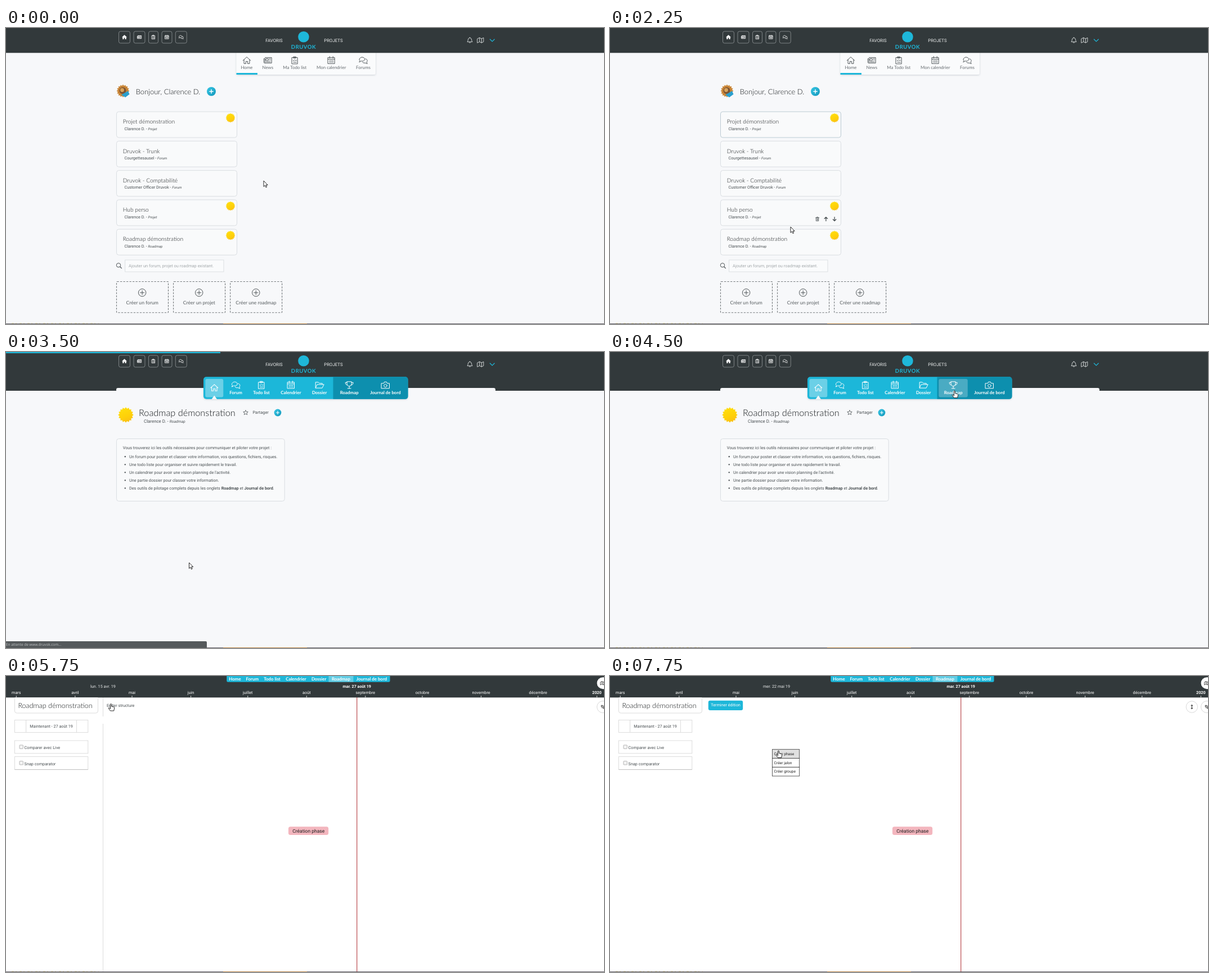
Recreate the animation shown at these times as an HTML page. Size 1063 px wide and 527 px high, loop 8 s.

```html
<!DOCTYPE html>
<html lang="fr">
<head>
<meta charset="utf-8">
<title>Roadmap</title>
<style>
html, body { margin: 0; width: 100%; height: 100%; overflow: hidden; background: #f7f8fa; }
svg { display: block; width: 100vw; height: 100vh; font-family: Roboto, sans-serif; text-rendering: geometricPrecision; }
.q { font-family: Lato, sans-serif; }
.o { font-family: "Open Sans", sans-serif; }
.m { text-anchor: middle; }
.l { font-weight: 300; }
.b { font-weight: 700; }
.i { font-style: italic; }
</style>
</head>
<body>
<svg id="stage" viewBox="0 0 1063 527" preserveAspectRatio="none"></svg>
<script>
const LOOP = 8000, STEP = 250;
const CYAN = '#1eb7d9', DARK = '#32393b', INK = '#4a5053', TITLE = '#14181a', SMALL = 7.27;
const BRAND = 'Druvok', USER = 'Clarence D.';

const ICONS = {
  home: 'M-7 .5L0-6L7 .5M-5-1.2V6H-1.6V2H1.6V6H5V-1.2',
  news: 'M-5-5H7V5H-6Q-7 5-7 4V-3H-5V4M-3-3H1V.5H-3ZM3-3H5M3-.5H5M-3 2.8H5',
  clip: 'M-5-5H5V6.5H-5ZM-2-6.5H2V-4H-2ZM-3 0L-2 1L-.5-1M1 0H3M-2.5 3.5H3',
  cal: 'M-6-5H6V6H-6ZM-6-2H6M-3-7V-4M3-7V-4M-3.5 .7H-2M-.7 .7H.7M2 .7H3.5M-3.5 3.3H-2M-.7 3.3H.7M2 3.3H3.5',
  chat: 'M-7 3Q-6 2-6 1C-9-2-5-5.8-2-5.6C4-5.5 4 1-1 1.5Q-3 1.7-4 1.2Q-5 3-7 3ZM4-2.6C8-2 8 1.6 6.3 3.3Q6.4 5 7.5 6Q5.4 6 4 4.8Q.5 5.6-1.2 3.6',
  folder: 'M-7 5V-5H-2L0-3H5V-1M-7 5L-4-1H8L5 5Z',
  cup: 'M-4-6H4V-2Q4 2 0 2Q-4 2-4-2ZM-4-4.5H-7Q-7 0-3.3 0M4-4.5H7Q7 0 3.3 0M0 2V6M-3 6H3',
  camera: 'M-7-3H-3L-2-5.5H2L3-3H7V6H-7ZM2.7 1.2A2.7 2.7 0 1 1 2.7 1.1Z',
  bell: 'M-5 3Q-3.5 1-3.5-2Q-3-5 0-5Q3-5 3.5-2Q3.5 1 5 3ZM0-5V-6M-1.5 4.7Q0 6.5 1.5 4.7',
  map: 'M-6-3L-2-5L2-3L6-5V3L2 5L-2 3L-6 5ZM-2-5V3M2-3V5',
  trash: 'M-3-3.5H3V5H-3ZM-4.5-3.5H4.5M-1.5-5H1.5M-1-1V3M1-1V3',
  up: 'M0 5V-5M-4-1L0-5L4-1',
  down: 'M0-5V5M-4 1L0 5L4 1',
  updown: 'M0-5V5M-2-3L0-5L2-3M-2 3L0 5L2 3',
  crop: 'M-3-6V3H6M-6-3H3V6',
  plus: 'M0-3V3M-3 0H3'
};

// pointer keys: time, x, y
const PATH = [
  [0, 458, 272], [500, 450, 330], [1000, 300, 400], [1250, 215, 400], [1500, 230, 300],
  [1750, 260, 180], [2000, 300, 165], [2250, 321, 354], [2500, 325.5, 375], [3750, 325.5, 375],
  [4000, 400, 300], [4250, 560, 130], [4500, 612.5, 69], [5000, 612.5, 69], [5250, 560, 75],
  [5500, 330, 66], [5750, 186.5, 49.5], [6500, 186.5, 49.5], [7000, 240, 105],
  [7250, 268, 122], [7500, 279.5, 130], [7750, 299.5, 133]
];
const HAND = [[2000, 2250], [2500, 3250], [4500, 5250], [5750, 6750], [7750, 8000]];
const BAR = { 2750: 90, 3000: 190, 3250: 290, 3500: 381, 3750: 1011, 4750: 120, 5000: 371, 5250: 1011 };

const within = (t, a, b) => t >= a && t < b;
const text = (x, y, size, str, cls = '', fill = INK) =>
  `<text x="${x}" y="${y}" font-size="${size}" class="${cls}" fill="${fill}">${str}</text>`;
const rect = (x, y, w, h, fill, rx = 0, more = '') =>
  `<rect x="${x}" y="${y}" width="${w}" height="${h}" rx="${rx}" fill="${fill}" ${more}/>`;
const line = (color, w = .8) => `stroke="${color}" stroke-width="${w}"`;
const circle = (x, y, r, fill, more = '') => `<circle cx="${x}" cy="${y}" r="${r}" fill="${fill}" ${more}/>`;
const path = (d, fill, more = '') => `<path d="${d}" fill="${fill}" ${more}/>`;
const icon = (name, x, y, k, color, w = 1) =>
  `<path d="${ICONS[name]}" transform="translate(${x} ${y}) scale(${k})" fill="none" ${line(color, w / k)} stroke-linejoin="round" stroke-linecap="round"/>`;

function star(x, y, r, inner, n, fill, more = '') {
  let d = '';
  for (let i = 0; i < 2 * n; i++) {
    const a = Math.PI * (i / n - .5), q = i % 2 ? r * inner : r;
    d += `${i ? 'L' : 'M'}${(x + q * Math.cos(a)).toFixed(2)} ${(y + q * Math.sin(a)).toFixed(2)}`;
  }
  return path(d + 'Z', fill, more);
}
const sun = (x, y, r) => star(x, y, r, .82, 16, 'url(#sun)');
const plusDot = (x, y, r) => circle(x, y, r, 'url(#sea)') + icon('plus', x, y, r / 7.5, '#fff', r / 5.5);

function pointerAt(t) {
  let i = PATH.length - 1;
  while (PATH[i][0] > t) i--;
  const a = PATH[i], b = PATH[i + 1] || a;
  const k = b === a ? 0 : (t - a[0]) / (b[0] - a[0]);
  return { x: a[1] + (b[1] - a[1]) * k, y: a[2] + (b[2] - a[2]) * k };
}

function pointer(t) {
  const p = pointerAt(t), hand = HAND.some(([a, b]) => within(t, a, b));
  const d = hand
    ? 'M-1 1Q-1 0 0 0Q1 0 1 1V4.6L5 5.6Q6.3 6 6.2 7.4L5.2 12.5H-1L-4 8.5Q-4.6 7-3.2 7.1L-1 8.8Z'
    : 'M0 0V10.4L2.4 8.2L4 11.8L5.7 11L4.1 7.5H7.2Z';
  return `<g transform="translate(${p.x} ${p.y})">${path(d, '#fff', line('#111', .9) + ' stroke-linejoin="round"')}</g>`;
}

function topBar(h) {
  let s = rect(0, 0, 1063, h, DARK);
  [['home', 210.5, 20], ['news', 237, 20], ['clip', 262, 17], ['cal', 286, 18], ['chat', 311.3, 20]].forEach(([n, x, w], i) => {
    s += rect(x - w / 2, 6, w, 21, 'none', 3, line('#858b8d', .9));
    s += i ? icon(n, x, 16.2, .52, '#fff', .8) : path('M206 16.5L210.5 12.3L215 16.5H213.7V20H211.5V17.5H209.5V20H207.3V16.5Z', '#fff');
  });
  s += text(476.5, 24.6, 7.85, 'FAVORIS', 'm', '#eceeee') + text(582, 24.6, 7.85, 'PROJETS', 'm', '#eceeee');
  s += circle(529, 15.7, 9.8, CYAN);
  s += `<text x="529" y="36.6" font-size="9.6" letter-spacing=".5" class="q b m" fill="${CYAN}">${BRAND.toUpperCase()}</text>`;
  s += icon('bell', 824.5, 21.8, .85, '#dfe2e3', .9) + icon('map', 843.5, 21.8, .9, '#dfe2e3', .9);
  return s + path('M860 19.8L864.3 24L868.6 19.8', 'none', line(CYAN, 1.2));
}

const cardAt = t => {
  const p = pointerAt(t);
  return p.x > 196 && p.x < 410 ? Math.floor((p.y - 149) / 52.3) : -1;
};

function homePage(t) {
  let s = rect(0, 0, 1063, 527, '#f7f8fa');
  s += rect(409.5, 40, 247.5, 43, '#fafbfc', 3, 'filter="url(#soft)"') + topBar(44.3);
  s += rect(409.5, 80, 37.5, 3, CYAN);
  [['home', 428, 'Home'], ['news', 465.3, 'News'], ['clip', 513.3, 'Ma Todo list'], ['cal', 578.3, 'Mon calendrier'], ['chat', 635, 'Forums']]
    .forEach(([n, x, label]) => { s += icon(n, x, 57.5, .98, '#50575a') + text(x, 73.2, 7.9, label, 'q m', '#666c70'); });

  s += star(208, 112, 11.5, .8, 16, '#c98536') + circle(207.5, 111.5, 6, '#7c5433') + circle(206.5, 110.5, 3.4, '#d9a45c');
  s += path('M205 119L217 112L219.5 118L212 123.5Z', '#2a9fce');
  s += text(230.7, 117.6, 12.95, 'Bonjour, ' + USER, 'q l', TITLE) + plusDot(365, 113, 8);

  const hover = cardAt(t), last = t ? cardAt(t - STEP) : -1;
  [['Projet démonstration', USER, 'Projet', 1], [BRAND + ' - Trunk', 'Courgettesausel', 'Forum'],
   [BRAND + ' - Comptabilité', 'Customer Officer ' + BRAND, 'Forum'], ['Hub perso', USER, 'Projet', 1],
   ['Roadmap démonstration', USER, 'Roadmap', 1]].forEach(([name, by, kind, sunny], i) => {
    const y = 149 + i * 52.3;
    s += rect(196.5, y, 214, 46, '#f9fafb', 4, line(i === last ? '#b4c4cf' : '#d6dbdf', .9));
    s += text(207.7, y + 21.2, 10.2, name, 'q l', TITLE);
    s += text(210.5, y + 32.7, SMALL, `${by} - <tspan class="i" font-size="6.2">${kind}</tspan>`);
    if (sunny) s += sun(399, y + 11, 8.4);
    if (i === hover) ['trash', 'up', 'down'].forEach((n, k) => { s += icon(n, 368.7 + k * 15.2, y + 34.2, .68, '#4a5053', k ? 1.3 : .8); });
  });

  s += circle(200, 422.3, 3.7, 'none', line('#4b5154', 1)) + path('M202.7 425L205.8 428.2', 'none', line('#4b5154', 1.2));
  s += rect(211.7, 413, 175.3, 21, '#fafbfc', 0, line('#d5d9dc'));
  s += text(218, 426.3, 7.5, 'Ajouter un forum, projet ou roadmap existant.', '', '#a3a8ab');
  ['un forum', 'un projet', 'une roadmap'].forEach((what, i) => {
    const x = 196.5 + i * 101.1;
    s += rect(x, 451.5, 92, 55.3, 'none', 1, line('#74797c', 1.1) + ' stroke-dasharray="3.3 2.2"');
    s += circle(x + 45.6, 471.2, 6.7, 'none', line('#4b5154', 1)) + icon('plus', x + 45.6, 471.2, 1.2, '#4b5154');
    s += text(x + 45.7, 492.3, 8.6, 'Créer ' + what, 'q m', '#565c5f');
  });
  return s;
}

function projectPage(t) {
  let s = rect(0, 0, 1063, 527, '#f7f8fa') + topBar(69) + rect(196, 64, 674, 9, '#f7f8fa', 3);
  s += rect(351, 44.3, 363.5, 39.5, CYAN, 5, 'filter="url(#soft)"') + path('M581.5 44.3H709.5Q714.5 44.3 714.5 49.3V78.8Q714.5 83.8 709.5 83.8H581.5Z', '#0d8fae');
  s += rect(354.3, 48, 32, 32.5, '#fff', 3, 'opacity=".35"') + path('M365.5 83.9L370.3 77.5L375 83.9Z', '#f7f8fa');
  if (t >= 4500) s += rect(584.3, 48, 51.5, 32.5, '#fff', 3, 'opacity=".25"');
  s += icon('home', 370.3, 63.5, .95, '#fff');
  [['chat', 408.5, 'Forum'], ['clip', 454, 'Todo list'], ['cal', 506.5, 'Calendrier'], ['folder', 557.2, 'Dossier'], ['cup', 610.2, 'Roadmap'], ['camera', 674.5, 'Journal de bord']]
    .forEach(([n, x, label]) => { s += icon(n, x, 58.8, 1, '#fff') + text(x, 74.6, 7.9, label, 'q b m', '#fff'); });

  s += sun(213, 112, 13.8) + text(236, 113.8, 16.3, 'Roadmap démonstration', 'q l', TITLE);
  s += text(245, 125.8, 7.9, `${USER} - <tspan class="i" font-size="6.75">Roadmap</tspan>`);
  s += star(426, 108, 4.5, .45, 5, 'none', line('#4b5154') + ' stroke-linejoin="round"');
  s += text(438.5, 110.4, 7.4, 'Partager') + plusDot(483, 108, 6.4);

  s += rect(196.5, 154.5, 298.7, 111, '#f9fafb', 4, line('#d6dbdf', .9));
  s += text(207.7, 172.7, SMALL, 'Vous trouverez ici les outils nécessaires pour communiquer et piloter votre projet :');
  ['Un forum pour poster et classer votre information, vos questions, fichiers, risques.',
   'Une todo liste pour organiser et suivre rapidement le travail.',
   "Un calendrier pour avoir une vision planning de l'activité.",
   'Une partie dossier pour classer votre information.',
   'Des outils de pilotage complets depuis les onglets <tspan class="b">Roadmap</tspan> et <tspan class="b">Journal de bord</tspan>.'
  ].forEach((str, i) => {
    const y = 188.6 + i * 14.03;
    s += circle(211.8, y - 2.3, 1.2, INK) + text(219, y, SMALL, str);
  });
  return s;
}

const DAYS = ['dim.', 'lun.', 'mar.', 'mer.', 'jeu.', 'ven.', 'sam.'];
const SHORT = ['janv.', 'févr.', 'mars', 'avr.', 'mai', 'juin', 'juil.', 'août', 'sept.', 'oct.', 'nov.', 'déc.'];
const MONTHS = ['mars', 'avril', 'mai', 'juin', 'juillet', 'août', 'septembre', 'octobre', 'novembre', 'décembre', '2020'];
const DAY_W = 3.3726, X0 = 18.3;

function dateAt(x) {
  const d = new Date(2019, 2, 1 + Math.floor((x - X0) / DAY_W));
  return `${DAYS[d.getDay()]} ${d.getDate()} ${SHORT[d.getMonth()]} 19`;
}

function roadmapPage(t) {
  const ready = t >= 5250, edit = t >= 6500, menu = t >= 7500;
  const stuck = within(t, 5750, 6750); // the guide waits while the pointer is over the button
  const guide = stuck ? 172.5 : pointerAt(t).x - 3.5;
  const now = ready ? 623.8 : 125.5;
  const border = line('#d9d9d9', .9);
  let s = rect(0, 0, 1063, 527, '#fff');

  if (ready) s += path(`M${guide} 38V${stuck ? '72M' + guide + ' 85' : ''}V527`, 'none', line('#d8d8d8', .9));
  s += path(`M${now} 38V527`, 'none', line(ready ? '#b5383c' : '#6d444a', 1.1));
  s += rect(0, 0, 1063, 38.3, DARK);
  MONTHS.forEach((m, i) => {
    const x = X0 + DAY_W * Math.round((Date.UTC(2019, 2 + i, 1) - Date.UTC(2019, 2, 1)) / 864e5);
    s += text(x, 32.3, SMALL, m, 'm' + (i === 10 ? ' b' : ''), '#fff') + path(`M${x} 35V38.3`, 'none', line('#fff', .8));
  });
  s += text(now, 20.8, 7.2, 'mar. 27 août 19', 'm b', '#fff');
  if (ready) s += text(guide, 20.8, SMALL, dateAt(guide), 'm', '#e8eaea');

  s += rect(392.3, -4, 290.3, 14.8, CYAN, 2.5) + rect(573.5, 0, 44, 10.8, '#fff', 0, 'opacity=".3"');
  [[407, 'Home'], [437.8, 'Forum'], [473, 'Todo list'], [515.4, 'Calendrier'], [556.2, 'Dossier'], [595.4, 'Roadmap'], [650, 'Journal de bord']]
    .forEach(([x, label]) => { s += text(x, 8.2, 7.9, label, 'q b m', '#fff'); });

  s += path('M15.4 38.3V62Q15.4 66 19.4 66H159.5Q163.5 66 163.5 62V38.3', '#fff', border);
  s += text(21.4, 57.2, 12.55, 'Roadmap démonstration', 'q l', TITLE);
  s += edit
    ? rect(174.8, 43.7, 61.4, 17.2, CYAN, 3) + text(205.5, 54.4, SMALL, 'Terminer édition', 'm', '#fff')
    : text(179, 54.6, SMALL, 'Editer structure');
  s += rect(15.4, 78.4, 130.4, 22, '#fff', 0, border) + path('M35.6 78.4V100.4M125.5 78.4V100.4', 'none', border);
  s += text(80.5, 91.9, SMALL, 'Maintenant - 27 août 19', 'm');
  [['Comparer avec Live', 115], ['Snap comparator', 143.6]].forEach(([label, y]) => {
    s += rect(15.4, y, 130.4, 22.8, '#fff', 0, border) + rect(24, y + 8, 6.4, 6.4, '#f4f4f4', .8, line('#999', .7));
    s += text(32.6, y + 15.1, SMALL, label);
  });
  s += path('M15.4 166.6H145.8', 'none', line('#bdbdbd', .9));

  s += circle(1061, 12.7, 10.5, '#fff') + icon('map', 1060.5, 12.7, .6, '#333', .8);
  s += circle(1061, 55, 10.5, '#fff', line('#cfcfcf')) + icon('crop', 1061, 55, .55, '#333', 1);
  if (edit) s += circle(1034.3, 55, 10.2, '#fff', line('#cfcfcf')) + icon('updown', 1034.3, 55, .72, '#222', 1);
  if (ready) s += rect(502, 268.2, 71.2, 14.8, '#f3b6be', 3.5) + text(537.7, 278.6, 8.5, 'Création phase', 'm', '#1c1c1c');

  if (menu) ['phase', 'jalon', 'groupe'].forEach((what, i) => {
    const y = 130.7 + i * 15.8;
    s += rect(288.5, y, 48.2, 15.8, i === 0 && t >= 7750 ? '#e0e0e0' : '#fff', 0, line('#333', .8));
    s += text(291.6, y + 10.1, 6.7, 'Créer ' + what, '', '#222');
  });
  return s;
}

function overlays(t) {
  let s = path('M10 525.7H165', 'none', line('#d8c646', .6) + ' stroke-dasharray="4 3 2 5" opacity=".7"');
  s += rect(0, 526.1, 1063, .9, '#55525c') + rect(386, 526.1, 149, .9, '#c48a45');
  if (within(t, 2750, 3750) || within(t, 4750, 5250))
    s += rect(-3, 515, 360, 14, '#55595b', 2) + text(0, 523.2, 6.4, `En attente de www.${BRAND.toLowerCase()}.com...`, 'o', '#c2c5c6');
  if (BAR[t]) s += rect(0, 0, BAR[t], 2.2, CYAN);
  return s;
}

const DEFS = `<defs>
<linearGradient id="sun" x1=".3" x2=".7" y2="1"><stop stop-color="#ffdf0c"/><stop offset=".6" stop-color="#fed00a"/><stop offset="1" stop-color="#fabd14"/></linearGradient>
<linearGradient id="sea" x2="1" y2="1"><stop stop-color="#36c6e4"/><stop offset="1" stop-color="#1397bb"/></linearGradient>
<filter id="soft" x="-10%" y="-30%" width="120%" height="160%"><feDropShadow dx="0" dy="1" stdDeviation="1.6" flood-color="#456" flood-opacity=".25"/></filter>
</defs>`;

const stage = document.getElementById('stage');
let shown = -1;
function draw(ms) {
  const t = Math.floor((ms % LOOP) / STEP) * STEP;
  if (t !== shown) {
    shown = t;
    const page = t < 3250 ? homePage : t < 5000 ? projectPage : roadmapPage;
    stage.innerHTML = DEFS + page(t) + overlays(t) + pointer(t);
  }
}
const start = performance.now();
function tick() {
  draw(performance.now() - start);
  requestAnimationFrame(tick);
}
tick();
</script>
</body>
</html>
```
